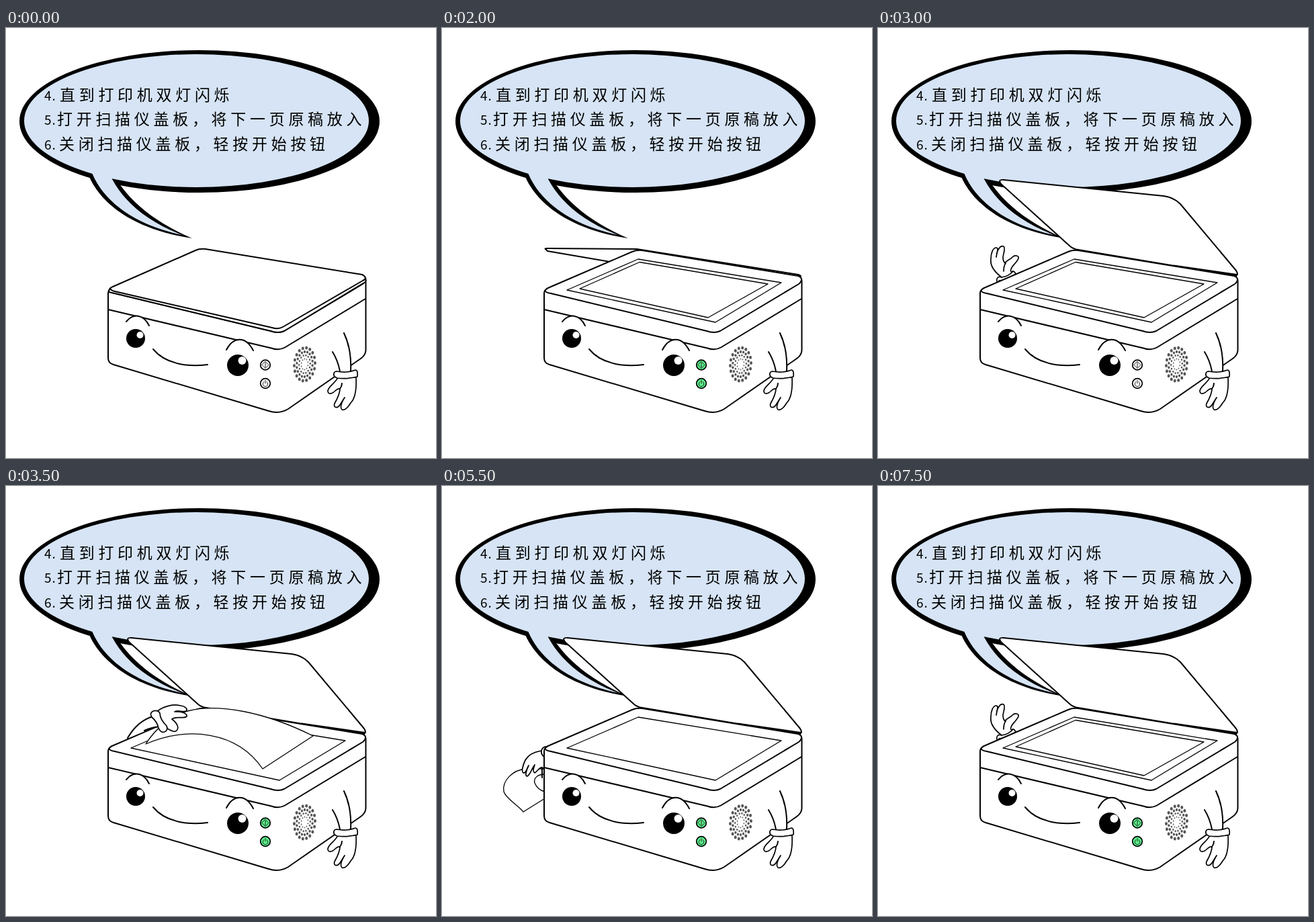
These frames come from a looping animation (640x640 px, 8 s). An HTML page:

```html
<!DOCTYPE html>
<html lang="zh">
<head>
<meta charset="utf-8">
<style>
html, body { margin: 0; width: 100%; height: 100%; overflow: hidden; background: #fff; }
svg { display: block; width: 100vw; height: 100vh; }
path, circle { stroke-linecap: round; stroke-linejoin: round; }
.ink { fill: #fff; stroke: #000; stroke-width: 2; }
.line { fill: none; stroke: #000; stroke-width: 2; }
.thin { fill: #fff; stroke: #000; stroke-width: 1.3; }
.glove { fill: #fff; stroke: #000; stroke-width: 1.7; }
.light { fill: #fff; stroke: #000; stroke-width: 1.7; }
.lit .light { fill: #5cf58c; }
.icon { fill: none; stroke: #222; stroke-width: 1; }
text { font: 23px "Noto Sans CJK SC", "Noto Sans CJK", sans-serif; letter-spacing: 5.7px; }
.num { font-size: 19px; letter-spacing: 1px; }
</style>
</head>
<body>
<svg id="stage" viewBox="0 0 640 640">
  <!-- speech bubble -->
  <ellipse cx="288" cy="139" rx="268" ry="106"/>
  <path d="M122 217C137 255 180 298 277 313C226 291 192 264 171 235L158 222Z"/>
  <ellipse cx="283.5" cy="138" rx="256.5" ry="99" fill="#d6e4f5"/>
  <path d="M127 213C141 251 182 291 262 308C213 289 178 262 158 225L160 210Z" fill="#d6e4f5"/>
  <g id="words"></g>

  <!-- parts behind the body -->
  <g data-part="wave" class="glove">
    <path d="M178 380C175 373 178 369 184 371C172 362 167 352 168 344C168 335 171 327 176 327C179 327 178 331 177 335C179 328 183 323 187 325C190 328 187 334 186 341Q186 347 189 350C192 345 197 345 200 341C204 337 210 339 209 343C206 350 199 354 198 359Q196 364 201 362Q206 363 205 372"/>
    <path fill="none" d="M184 371Q194 370 201 362M177 335L176 341M187 362Q187 354 190 350M180 376Q193 376 204 367"/>
  </g>
  <g data-part="side">
    <path class="thin" d="M153 465L121 485C113 475 95 465 92 455C89 439 105 422 126 421L153 421Z"/>
    <path class="thin" d="M153 429C142 429 136 435 138 442Q142 452 153 455"/>
    <path class="glove" d="M157 388Q150 387 148 394C136 396 128 401 124 408C120 416 118 425 121 427C125 428 126 421 129 416C125 424 123 432 127 432C132 429 133 421 138 415Q134 425 138 427C143 424 145 418 149 419L158 424Z"/>
    <path class="line" d="M148 394Q147 401 154 404M149 419V434"/>
  </g>
  <path data-part="ajar" class="ink" d="M154 329Q152 328 158 328L290 329L530 367Q538 370 530 371L416 375Q406 375 397 373L157 332Z"/>
  <g data-part="half">
    <path class="ink" d="M169 264Q164 262 173 263L413 295Q427 297 437 304L531 366Q536 370 529 369L298 329Q291 328 284 325Z"/>
    <path d="M437 303L535 366L533 370L505 351Z"/>
  </g>
  <g data-part="open">
    <path class="ink" d="M183 232Q178 225 187 226L425 250Q440 252 450 262L533 361Q538 369 530 369L298 330Q291 329 286 325Z"/>
    <path d="M440 352.500L534 366V371L440 356Z"/>
  </g>
  <g data-part="lift">
    <path class="thin" d="M185 227Q218 243 251 247C245 285 230 310 222 345Q185 342 148 326C167 297 178 262 185 227Z"/>
    <path class="glove" d="M181 382C180 365 184 354 191 349C183 342 178 332 182 329C187 327 190 335 195 338C191 329 190 321 195 320C200 321 200 331 205 335C205 328 211 325 213 330C214 340 212 347 206 352Q209 360 207 372"/>
    <path class="line" d="M188 352Q197 358 207 351"/>
  </g>

  <!-- printer body -->
  <path class="ink" d="M152 395Q152 389 160 386L283 333Q290 330 298 331L530 369Q536 371 535.500 377V480Q535 487 528 492L420 567Q407 575 391 570L160 501Q152 499 152 491Z"/>
  <path class="line" d="M152 419L395 476.500Q406 480.500 415 475.500L535 403"/>
  <path class="line" d="M153 391Q155 394 162 395L394 451Q405 455 414 451L531 381Q535 378 535 374"/>

  <path data-part="bed" class="thin" d="M186 390L292 344L505 379L407 438Z"/>
  <path data-part="flat" class="thin" d="M205 388L294 348.500L485 381L396 431Z"/>
  <g data-part="peel">
    <path class="thin" d="M208 384C222 362 244 342 270 335C315 323 385 336 457 372L382 421C344 365 270 357 208 384Z"/>
    <path fill="#fff" d="M182 375C191 358 205 347 222 341L230 357Q213 361 204 366Z"/>
    <path class="line" d="M181 375C191 358 204 347 219 343M206 364Q217 359 229 358"/>
    <path class="glove" d="M224 336C234 328 249 324 260 327C267 328 271 332 268 335C264 337 256 333 251 336C260 335 270 338 269 343C264 347 253 342 247 347C255 353 258 360 254 364C250 368 243 362 236 359Z"/>
    <path class="glove" d="M217 344Q213 338 219 335Q226 333 229 338Q229 347 239 357Q242 363 236 366Q230 368 227 360Q225 351 217 344Z"/>
  </g>
  <g data-part="shut">
    <path class="ink" d="M153 393Q153 387 159 385L282 331Q288 328 297 329L530 367Q537 370 535 378L414 451Q405 455 394 451L162 395Z"/>
    <path class="line" d="M155 388Q157 391 162 392L396 446Q405 449 412 445L531 376Q535 374 535 372"/>
  </g>

  <!-- face -->
  <path class="ink" d="M179 437C189 425 204 425 213 443"/>
  <path class="ink" d="M328 479C338 460 356 457 368 480"/>
  <circle cx="193" cy="462" r="14"/><circle cx="199.500" cy="457" r="5" fill="#fff"/>
  <circle cx="345" cy="502" r="16"/><circle cx="351.500" cy="495" r="6" fill="#fff"/>
  <path class="line" d="M219 478C236 499 268 505 300 501"/>

  <!-- buttons and speaker -->
  <circle class="light" cx="386" cy="501.500" r="7.300"/>
  <circle class="light" cx="386" cy="529" r="7.300"/>
  <path class="icon" d="M386 496.500L391 501.500L386 506.500L381 501.500ZM386 498V505M384 526.500A3.800 3.800 0 1 0 388 526.500M386 524.500V529"/>
  <g id="speaker" fill="#555"></g>

  <!-- resting arm -->
  <path fill="#fff" d="M487 483Q494 495 497 512L513 512Q515 485 505 458Z"/>
  <path class="line" d="M503 454C512 473 514 492 513 511M486 482Q494 495 497 511"/>
  <path class="glove" d="M494 520C490 529 480 533 479 540C479 546 485 545 490 540Q494 536 497 537C497 545 493 552 489 559C487 565 493 567 497 561L504 550C499 558 497 565 500 568C505 570 510 563 513 558C519 552 522 540 521 520Z"/>
  <path class="line" d="M497 537Q500 533 500 529"/>
  <path class="glove" d="M492 511Q507 514 520 509Q524 509 523 519Q507 523 493 521Q487 519 488 514Q489 511 492 511Z"/>
</svg>
<script>
const stage = document.getElementById('stage');
const NS = stage.namespaceURI;
const STEP = 500;

function add(parent, tag, attrs, content = '') {
  const el = document.createElementNS(NS, tag);
  for (const key in attrs) el.setAttribute(key, attrs[key]);
  el.textContent = content;
  document.getElementById(parent).append(el);
}

[
  ['4.', '直到打印机双灯闪烁', 80, 108],
  ['5.', '打开扫描仪盖板，将下一页原稿放入', 76, 144],
  ['6.', '关闭扫描仪盖板，轻按开始按钮', 79, 181]
].forEach(([num, line, x, y]) => {
  add('words', 'text', { x: 57, y, class: 'num' }, num);
  add('words', 'text', { x, y }, line);
});

// speaker: rings of dots, smaller towards the middle
[[1, 18, 2.2], [0.76, 18, 1.8], [0.54, 14, 1.3], [0.33, 10, 0.9]].forEach(([size, count, r], ring) => {
  for (let i = 0; i < count; i++) {
    const a = (i + ring / 2) / count * 2 * Math.PI;
    add('speaker', 'ellipse', {
      cx: 444.5 + 15.5 * size * Math.cos(a),
      cy: 500.5 + 24.5 * size * Math.sin(a) - 2 * size * Math.cos(a),
      rx: r * 0.9, ry: r * 1.15
    });
  }
});

// visible parts for each half second
const poses = [
  'shut', 'shut lit', 'shut', 'shut lit',
  'ajar bed flat lit', 'half bed flat wave', 'open bed flat wave', 'open bed peel lit',
  'open bed lift lit', 'open bed side', 'open bed', 'open bed side lit',
  'open bed lift lit', 'open bed peel', 'open bed flat', 'open bed flat wave lit'
].map(pose => pose.split(' '));
const parts = [...document.querySelectorAll('[data-part]')];

function draw(now) {
  const pose = poses[Math.floor(now / STEP) % poses.length];
  for (const part of parts) {
    part.style.display = pose.includes(part.dataset.part) ? '' : 'none';
  }
  stage.classList.toggle('lit', pose.includes('lit'));
}

const start = performance.now();
function tick() {
  draw(performance.now() - start);
  requestAnimationFrame(tick);
}
tick();
</script>
</body>
</html>
```
